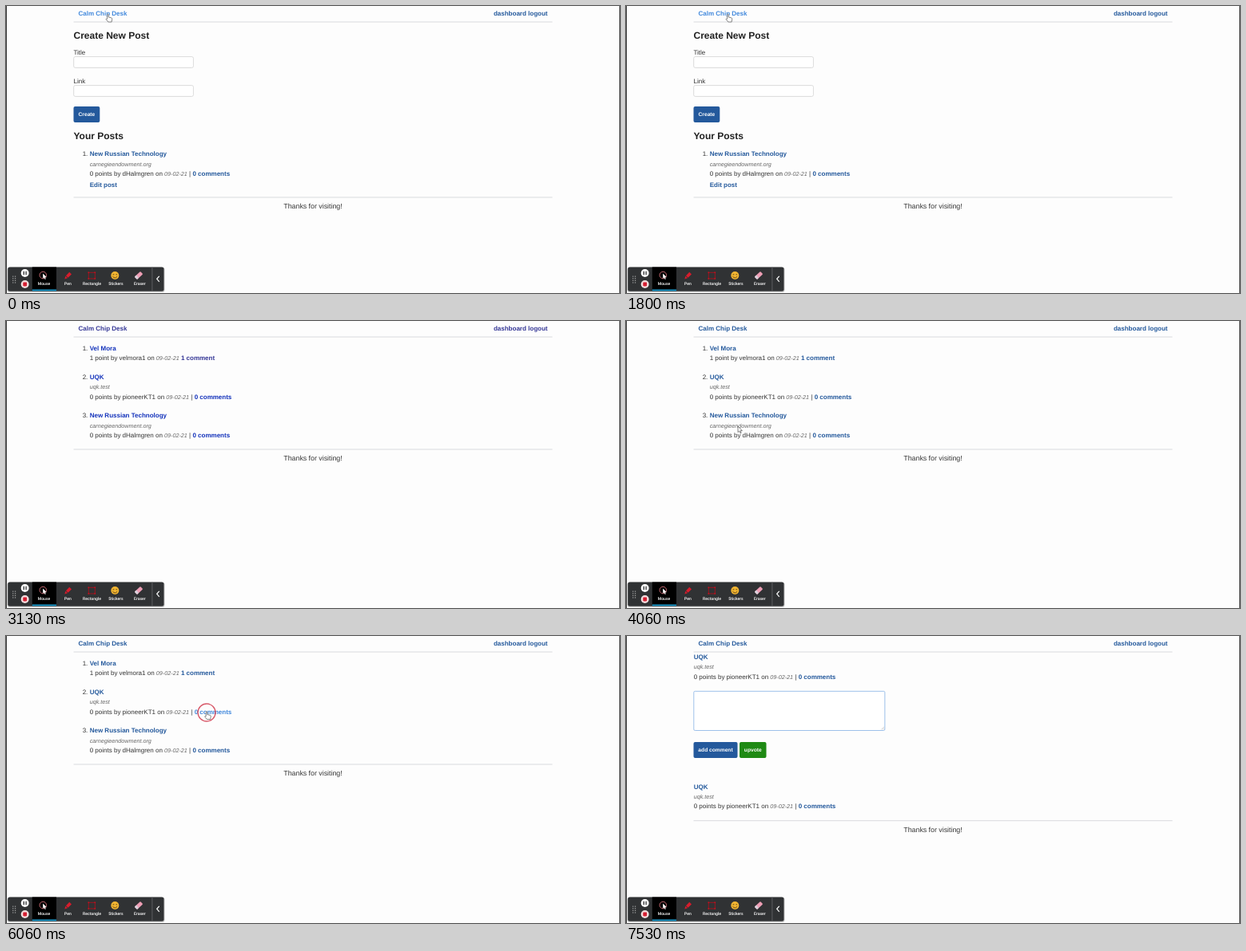
Write an HTML page that moves like this. It is 768 px wide and 360 px high and loops after 8 s.

```html
<!DOCTYPE html>
<html lang="en">
<head>
<meta charset="utf-8">
<title>Post list</title>
<style>
  html, body { margin: 0; height: 100%; overflow: hidden; background: #fdfdfd; }
  svg { display: block; width: 100vw; height: 100vh; --link: #24599c; --seen: #24599c; }
  text { font: 8px "Liberation Sans", Arial, sans-serif; fill: #333; text-rendering: geometricPrecision; white-space: pre; }
  .h { font-size: 12px; font-weight: 700; fill: #222; }
  .a, .v { font-weight: 700; fill: var(--link); }
  .v { fill: var(--seen); }
  .i { font-size: 7.2px; font-style: italic; fill: #666; }
  .b { font-size: 6.67px; font-weight: 700; fill: #fff; text-anchor: middle; }
  .foot { font-size: 8.8px; text-anchor: middle; }
  .end { text-anchor: end; }
  .tool { font: 500 5.1px Roboto, sans-serif; fill: #fff; text-anchor: middle; }
  .field { fill: #fff; stroke: #d2d2d2; stroke-width: .8; }
  .rule { stroke: #d9dbde; stroke-width: 1; }
</style>
</head>
<body>
<svg id="stage" viewBox="0 0 768 360"></svg>
<script>
const LOOP = 8000, PAGE_LIST = 3130, PAGE_POST = 6930, FADE = 330;
const CLICKS = [[2060, 127.5, 12], [6000, 251, 96]];
const LINK = [36, 89, 156], LINK_START = [19, 50, 187], SEEN_START = [53, 55, 150], HOVER = [64, 136, 220];

// Cursor tip: time, x, y
const PATH = [
  [3500, 131, 28], [3930, 139, 129], [4000, 140, 132], [4060, 140, 132],
  [4660, 322, 111], [5060, 320, 110], [5330, 307, 106], [5860, 251, 94.5], [LOOP, 251, 94.5]
];

const text = (x, y, s, cls = '') => `<text x="${x}" y="${y}" class="${cls}">${s}</text>`;
const span = (cls, s) => `<tspan class="${cls}">${s}</tspan>`;
const rect = (x, y, w, h, attrs) => `<rect x="${x}" y="${y}" width="${w}" height="${h}" ${attrs}/>`;
const rule = y => `<path class="rule" d="M84.5 ${y}H683.5"/>`;
const button = (x, y, w, label, color) =>
  rect(x, y, w, 20, `rx="2" fill="${color}"`) + text(x + w / 2, y + 12.2, label, 'b');
const footer = y => rule(y) + text(384, y + 14.2, 'Thanks for visiting!', 'foot');
const header = id =>
  `<g id="${id}">${text(90.5, 12.4, 'Calm Chip Desk', 'v')}</g>` +
  text(677.5, 12.4, 'dashboard logout', 'v end') + rule(20);

const DATE = span('i', '09-02-21');
const POSTS = {
  first: { title: 'Vel Mora', meta: '1 point by velmora1 on ', comments: ' ' + span('v', '1 comment') },
  second: { title: 'UQK', host: 'uqk.test', meta: '0 points by pioneerKT1 on ', comments: ' | ' + span('a hot', '0 comments') },
  third: { title: 'New Russian Technology', host: 'carnegieendowment.org', meta: '0 points by dHalmgren on ', comments: ' | ' + span('a', '0 comments') }
};

function post({ title, host, meta, comments }, x, y, number) {
  const metaY = y + (host ? 24.4 : 12.1);
  return (number ? text(102.3, y, number + '.', 'end') : '') + text(x, y, title, 'a') +
    (host ? text(x, y + 12.2, host, 'i') : '') + text(x, metaY, meta + DATE + comments);
}

const formPage = header('home') +
  text(84.5, 41.2, 'Create New Post', 'h') +
  text(84.5, 61, 'Title') + rect(84.7, 63.6, 149.7, 13.8, 'rx="2" class="field"') +
  text(84.5, 97, 'Link') + rect(84.7, 99.6, 149.7, 13.8, 'rx="2" class="field"') +
  button(84.5, 126, 32.8, 'Create', '#24599c') +
  text(84.5, 166.8, 'Your Posts', 'h') +
  post(POSTS.third, 104.7, 188.4, 1) + text(104.7, 226.5, 'Edit post', 'a') + footer(240);

const listPage = header('listHome') + post(POSTS.first, 104.7, 37.2, 1) +
  post(POSTS.second, 104.7, 73.2, 2) + post(POSTS.third, 104.7, 121.4, 3) + footer(161);

const postPage = header('postHome') + post(POSTS.second, 84.7, 29.2) +
  rect(84.8, 69.3, 239, 49.2, 'rx="1.5" fill="#fff" stroke="#9dc0ea"') +
  '<path d="M319.5 117.3l3.3-3.3M321.5 117.3l1.3-1.3" stroke="#999" stroke-width=".5"/>' +
  button(84.5, 133, 55, 'add comment', '#24599c') + button(142, 133, 33.5, 'upvote', '#1f8a14') +
  post(POSTS.second, 84.7, 191.5) + footer(231.7);

const ARROW = 'M0 0V7.6L1.8 6L3 8.7L4.2 8.2L3 5.6H5.4Z';
const HAND = 'M-.8 .6Q0-.4 .8 .6V4L4.4 4.9Q5.4 5.2 5.2 6.5L4.6 10H.3L-2.4 6.6Q-2.2 5.4-.8 6.2Z';
const shape = (id, d) => `<path id="${id}" d="${d}" fill="#fff" stroke="#555" stroke-width=".7" stroke-linejoin="round"/>`;

const dots = [339.2, 341.8, 344.4, 347].map(y =>
  rect(8.2, y - .6, 1.2, 1.2, 'fill="#aaa"') + rect(11, y - .6, 1.2, 1.2, 'fill="#aaa"')).join('');
const labels = [['Mouse', 47.5], ['Pen', 77.5], ['Rectangle', 107.5], ['Stickers', 137.5], ['Eraser', 167.3]]
  .map(([name, x]) => text(x, 350.4, name, 'tool')).join('');
const handles = [103.3, 111.3].map(x => [334.3, 342].map(y =>
  rect(x - .8, y - .8, 1.6, 1.6, 'fill="#c4121f"')).join('')).join('');

const toolbar = rect(1.5, 327.8, 197, 31.2, 'rx="3" fill="#000" opacity=".22"') +
  rect(2.3, 327.5, 195.2, 30.3, 'rx="2.5" fill="#303234"') +
  rect(32.8, 327.5, 30.2, 29.8, 'fill="#000"') + rect(32.8, 355.6, 30.2, 1.7, 'fill="#179fd4"') +
  rect(182.5, 327.5, .8, 30, 'fill="#66686a"') + dots + labels +
  `<circle cx="23.7" cy="335" r="5" fill="#fff"/><path d="M22.3 332.7v4.6M25.1 332.7v4.6" stroke="#303234" stroke-width="1.3"/>
   <circle cx="23.7" cy="349" r="5" fill="#f3dfe0"/>${rect(21.3, 346.6, 4.8, 4.8, 'rx=".8" fill="#d51f32"')}
   <circle cx="46.3" cy="337.6" r="4.3" fill="none" stroke="#d6707a" stroke-width=".9"/>
   <path transform="translate(46.2 335.5) scale(.85)" d="${ARROW}" fill="#fff"/>
   <path d="M73.3 342.5L74.5 338.8L77 341.3ZM75 338.2L79.3 333.8L82 336.4L77.6 340.8Z" fill="#d81c2c"/>
   ${rect(103.3, 334.3, 8, 7.7, 'fill="none" stroke="#a8101c" stroke-width=".9"')}${handles}
   <circle cx="136.3" cy="338" r="5" fill="#f2b632"/>
   <path d="M133.6 336.8h1.8M137.4 336.8h1.8M133.4 339.2q2.9 3.6 5.8 0" fill="none" stroke="#5b3b12" stroke-width=".9"/>
   <g transform="rotate(-42 166 338)">${rect(161, 335.7, 10, 4.6, 'rx="1" fill="#ee9eb5"')}${rect(161, 335.7, 3, 4.6, 'rx="1" fill="#d9d2dc"')}</g>
   <path d="M191.7 338.8L188.7 342.3L191.7 345.8" fill="none" stroke="#fff" stroke-width="1.2"/>`;

const stage = document.getElementById('stage');
stage.innerHTML = rect(0, 0, 768, 360, 'fill="#fdfdfd"') +
  [formPage, listPage, postPage].map(p => `<g class="page">${p}</g>`).join('') +
  rect(0, 0, 1, 360, 'fill="#333"') + rect(767, 0, 1, 360, 'fill="#555"') + toolbar +
  `<circle id="ring" fill="none" stroke="#d4485a" stroke-width="1.4"/>` +
  `<g id="cursor">${shape('arrow', ARROW)}${shape('hand', HAND)}</g>`;

const find = selector => stage.querySelector(selector);
const pages = stage.querySelectorAll('.page');
const homeLink = find('#home text'), commentLink = pages[1].querySelector('.hot');
const ring = find('#ring'), cursor = find('#cursor'), arrow = find('#arrow'), hand = find('#hand');

const clamp = v => Math.min(1, Math.max(0, v));
const ease = v => v * v * (3 - 2 * v);
const mix = (a, b, p) => `rgb(${a.map((v, i) => v + (b[i] - v) * p)})`;
const show = (el, on) => el.style.display = on ? '' : 'none';

function cursorAt(t) {
  if (t < PAGE_LIST) return [127.5, 10];
  const next = PATH.findIndex(p => p[0] > t);
  if (next < 1) return PATH[0].slice(1);
  const [t0, x0, y0] = PATH[next - 1], [t1, x1, y1] = PATH[next];
  const p = ease((t - t0) / (t1 - t0));
  return [x0 + (x1 - x0) * p, y0 + (y1 - y0) * p];
}

function draw(t) {
  const page = t < PAGE_LIST ? 0 : t < PAGE_POST ? 1 : 2;
  pages.forEach((el, i) => show(el, i === page));

  const loaded = page ? clamp((t - [0, PAGE_LIST, PAGE_POST][page]) / FADE) : 1;
  stage.style.setProperty('--link', mix(LINK_START, LINK, loaded));
  stage.style.setProperty('--seen', mix(SEEN_START, LINK, loaded));
  homeLink.style.fill = mix(LINK, HOVER, 1);
  const hover = clamp((t - 5800) / 250);
  commentLink.style.fill = hover ? mix(LINK, HOVER, hover) : '';

  const pointing = page === 0 || t >= 5800;
  show(cursor, page === 0 || page === 1 && t >= 3500);
  show(arrow, !pointing);
  show(hand, pointing);
  cursor.setAttribute('transform', `translate(${cursorAt(t)})`);

  const click = CLICKS.find(c => t >= c[0] && t < c[0] + 600);
  show(ring, click);
  if (click) {
    const p = (t - click[0]) / 600;
    ring.setAttribute('cx', click[1]);
    ring.setAttribute('cy', click[2]);
    ring.setAttribute('r', 10.7 + 3 * p);
    ring.setAttribute('opacity', 1 - p);
  }
}

const start = performance.now();
function tick() {
  draw((performance.now() - start) % LOOP);
  requestAnimationFrame(tick);
}
tick();
</script>
</body>
</html>
```
